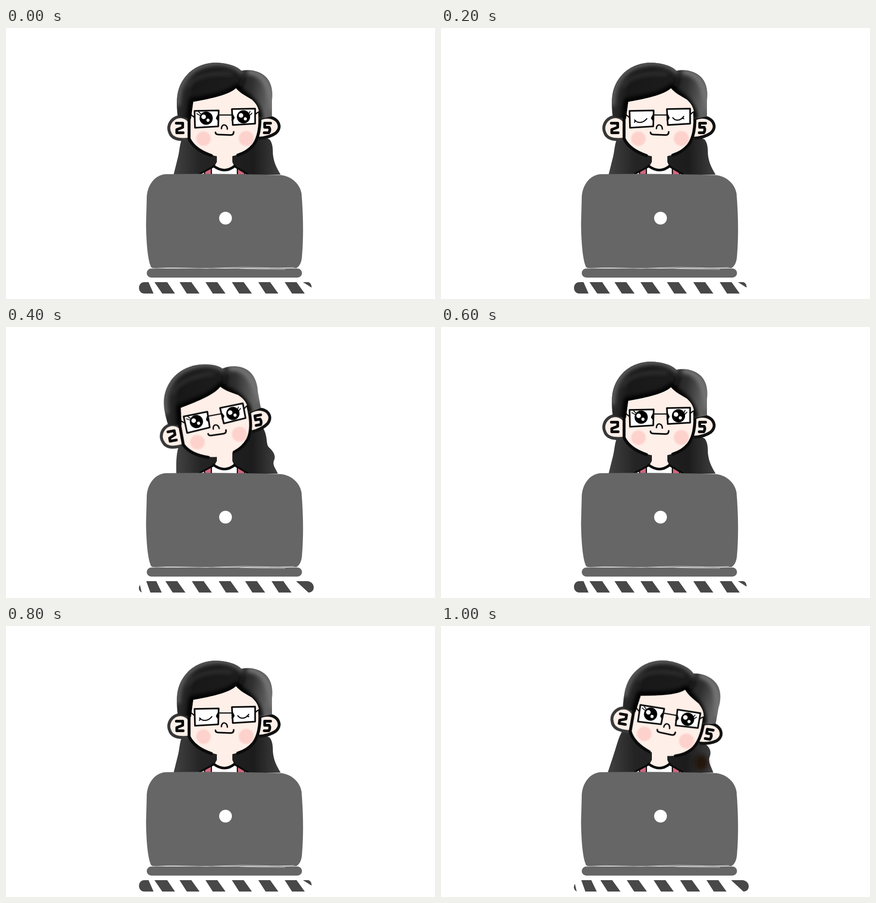
Animation of 942 by 595 pixels, one loop 1200 ms. Source, as an HTML page without scripts:

```html
<!DOCTYPE html>
<html lang="en">
<head>
<meta charset="utf-8">
<title>Girl at a laptop</title>
<style>
  html, body { margin: 0; width: 100%; height: 100%; overflow: hidden; background: #fff; }
  svg { display: block; width: 100%; height: 100%; }

  .line { fill: none; stroke: #0a0a0a; stroke-linecap: round; stroke-linejoin: round; }
  .skin { fill: #feefe8; }

  /* every pose is held, then cut */
  .head { animation: tilt 1.2s step-end infinite; }
  .open { animation: open .6s step-end infinite; }
  .shut { animation: shut .6s step-end infinite; }
  .upright { animation: upright .6s step-end infinite; }
  .leaning { animation: leaning .6s step-end infinite; }
  .left { animation: left 1.2s step-end infinite; }
  .right { animation: right 1.2s step-end infinite; }

  @keyframes tilt {
    0%, 50%, 100% { transform: none; }
    33.333% { transform: translate(487px, 320px) rotate(-10.4deg) translate(-487px, -321px); }
    83.333% { transform: translate(476px, 314px) rotate(10deg) translate(-476px, -314px); }
  }
  @keyframes open {
    0%, 66.667%, 100% { visibility: visible; }
    33.333% { visibility: hidden; }
  }
  @keyframes shut {
    0%, 66.667%, 100% { visibility: hidden; }
    33.333% { visibility: visible; }
  }
  @keyframes upright {
    0%, 100% { visibility: visible; }
    66.667% { visibility: hidden; }
  }
  @keyframes leaning {
    0%, 100% { visibility: hidden; }
    66.667% { visibility: visible; }
  }
  @keyframes left {
    0%, 50%, 100% { visibility: hidden; }
    33.333% { visibility: visible; }
  }
  @keyframes right {
    0%, 100% { visibility: hidden; }
    83.333% { visibility: visible; }
  }
</style>
</head>
<body>
<svg viewBox="0 0 942 595" preserveAspectRatio="none">
  <defs>
    <linearGradient id="crown" x2="1" y2=".1">
      <stop stop-color="#3c3c3c"/>
      <stop offset=".22" stop-color="#181818"/>
      <stop offset=".65" stop-color="#1c1c1c"/>
      <stop offset=".82" stop-color="#303030"/>
      <stop offset="1" stop-color="#606060"/>
    </linearGradient>
    <linearGradient id="locks">
      <stop stop-color="#424242"/>
      <stop offset=".25" stop-color="#242424"/>
      <stop offset=".75" stop-color="#1c1c1c"/>
      <stop offset="1" stop-color="#404040"/>
    </linearGradient>
    <filter id="soft" x="-30%" y="-30%" width="160%" height="160%">
      <feGaussianBlur stdDeviation="4"/>
    </filter>
    <filter id="blush" x="-20%" y="-20%" width="140%" height="140%">
      <feGaussianBlur stdDeviation="1.5"/>
    </filter>
    <path id="hair" d="M377 194C372 150 376 124 402 98C420 82 442 76 461 76C485 77 505 82 517 94C540 89 563 97 574 111C584 124 586 140 584 158V194L556 200C558 180 552 168 540 157C525 148 513 142 505 132C490 146 455 154 411 162L406 200Z"/>
    <clipPath id="hairClip"><use href="#hair"/></clipPath>
    <path id="slat" d="M0 558h26l18 25h-28Z"/>
  </defs>

  <!-- hair behind the shoulders -->
  <g fill="url(#locks)">
    <path class="upright" d="M388 240C380 256 382 270 376 290L368 322H603C594 306 588 296 586 276C586 262 585 253 579 245L540 225H410Z"/>
    <path class="left" d="M382 255C375 270 373 290 374 322H597C592 310 585 304 588 294C594 282 586 272 577 264C570 256 576 244 565 222H410Z"/>
    <g class="right">
      <path d="M400 228C390 242 386 262 378 286L366 322H598C594 310 587 300 589 290C594 278 592 270 584 262L540 235Z"/>
      <ellipse cx="571" cy="300" rx="15" ry="17" fill="#23130d" filter="url(#soft)"/>
    </g>
  </g>

  <!-- shirt and neck -->
  <path fill="#fff" d="M424 322L458 303Q480 320 500 303L533 322Z"/>
  <path fill="#d0667d" d="M437 322V314L451 307V322ZM508 322V307L523 317V322Z"/>
  <path class="line" stroke-width="2.5" d="M436 316V322M451 308V322M508 309V322M524 317V322"/>
  <path class="skin" d="M463 275H497V294L501 303Q480 318 458 303L463 294Z"/>
  <path class="line" stroke-width="5.5" d="M456 303Q480 321 502 303"/>
  <path class="line" stroke-width="4" d="M456 304L426 320M502 304L531 321"/>

  <g class="head">
    <!-- ears -->
    <g class="skin" stroke-width="6.5">
      <path stroke="#383838" d="M403 205C392 192 378 193 369 199C359 206 355 218 359 228C363 242 376 247 403 244"/>
      <path stroke="#111" d="M556 200C572 193 586 195 595 204C603 214 600 224 592 231C582 238 572 241 556 242"/>
    </g>
    <path class="line" stroke-width="6" d="M374 209H388V218L375 223V230H389M581 209H568V218H578Q581 224 577 230H567"/>

    <path class="skin" d="M404 155L505 126L558 160V215C556 250 530 282 480 283C440 283 410 260 404 240Z"/>
    <path class="line" stroke-width="6.5" d="M402 192V243C411 262 430 273 451 280M557 185C559 215 556 240 543 257C534 268 522 275 509 279"/>

    <use href="#hair" fill="url(#crown)"/>
    <g clip-path="url(#hairClip)" fill="none" filter="url(#soft)">
      <path stroke="#5c5c5c" stroke-width="11" d="M377 170C376 120 402 82 461 77C490 77 506 84 520 98"/>
      <path stroke="#303030" stroke-width="7" d="M398 130C412 105 450 97 497 101"/>
      <path stroke="#757575" stroke-width="12" d="M530 96C562 98 580 118 584 180"/>
      <path stroke="#111" stroke-width="8" d="M520 108Q518 126 508 134"/>
      <path stroke="#000" stroke-width="14" d="M404 200L409 161C455 152 490 146 505 131C520 145 553 160 557 200"/>
    </g>

    <g fill="#fed2cc" filter="url(#blush)">
      <circle cx="433.500" cy="243" r="16"/>
      <circle cx="527.500" cy="242.500" r="16.500"/>
    </g>

    <!-- glasses -->
    <g class="line" stroke-width="3.600">
      <path fill="#fff" d="M414 182L467 181L466 216L415 219Z"/>
      <path fill="#fff" d="M496 178L547 177V210L498 213Z"/>
      <path stroke-width="2.600" d="M469 191H496M413 196L406 190M547 190L553 185"/>
      <path stroke-width="4" d="M466 192L463 198L466 202M497 191L500 197L497 202"/>
    </g>

    <g class="open">
      <circle cx="439.500" cy="198" r="14.500"/>
      <circle cx="521.500" cy="195" r="14.500"/>
      <g fill="#fff">
        <circle cx="434" cy="195" r="5"/>
        <circle cx="443.500" cy="202.500" r="3.400"/>
        <circle cx="516" cy="192" r="5"/>
        <circle cx="525.500" cy="199.500" r="3.400"/>
      </g>
      <path class="line" stroke-width="1.800" d="M426 192L419 188M428 189L423 184M533 189L536 183M535 192L540 187"/>
    </g>
    <g class="shut line" stroke-width="2.500">
      <path d="M425 202C432 210 444 209 452 199M427 203L425 207"/>
      <path d="M509 197C515 205 526 204 533 194M530 198L533 199"/>
    </g>

    <path class="line" stroke-width="3" d="M473 221C473 210 486 210 486 222"/>
    <path class="line" stroke-width="3.500" d="M460 229Q460 234 467 234L493 235Q500 235 500 228"/>
  </g>

  <!-- laptop -->
  <path fill="#666" d="M350 321Q480 319 604 323C629 326 646 344 649 364Q655 440 650 500Q649 520 638 527H324Q318 527 317 521C311 505 308 470 307.500 430L309 375C309 346 326 323 350 321Z"/>
  <rect x="309" y="528" width="341" height="20" rx="10" fill="#666"/>
  <path fill="none" stroke="#ccc" d="M319 528Q360 525 400 527T480 526.500T560 526T632 525.500M512 528Q560 530 613 530"/>
  <circle cx="482" cy="417.500" r="14" fill="#fff"/>

  <!-- striped table edge -->
  <g class="upright" fill="#484848">
    <path d="M304 558H313L324 583H304C288 583 288 558 304 558Z"/>
    <path d="M326 558H354L371 583H343Z"/>
    <use href="#slat" x="381"/>
    <use href="#slat" x="438"/>
    <use href="#slat" x="496"/>
    <use href="#slat" x="554"/>
    <use href="#slat" x="612"/>
    <path d="M652 558H664Q671 560 671 570Z"/>
  </g>
  <g class="leaning" fill="#484848">
    <path d="M294 566L298 583Q288 577 294 566Z"/>
    <path d="M308 558H330L342 583H317Z"/>
    <use href="#slat" x="350"/>
    <use href="#slat" x="408"/>
    <use href="#slat" x="467"/>
    <use href="#slat" x="525"/>
    <use href="#slat" x="583"/>
    <path d="M637 558H662C680 560 680 583 664 583Z"/>
  </g>
</svg>
</body>
</html>
```
